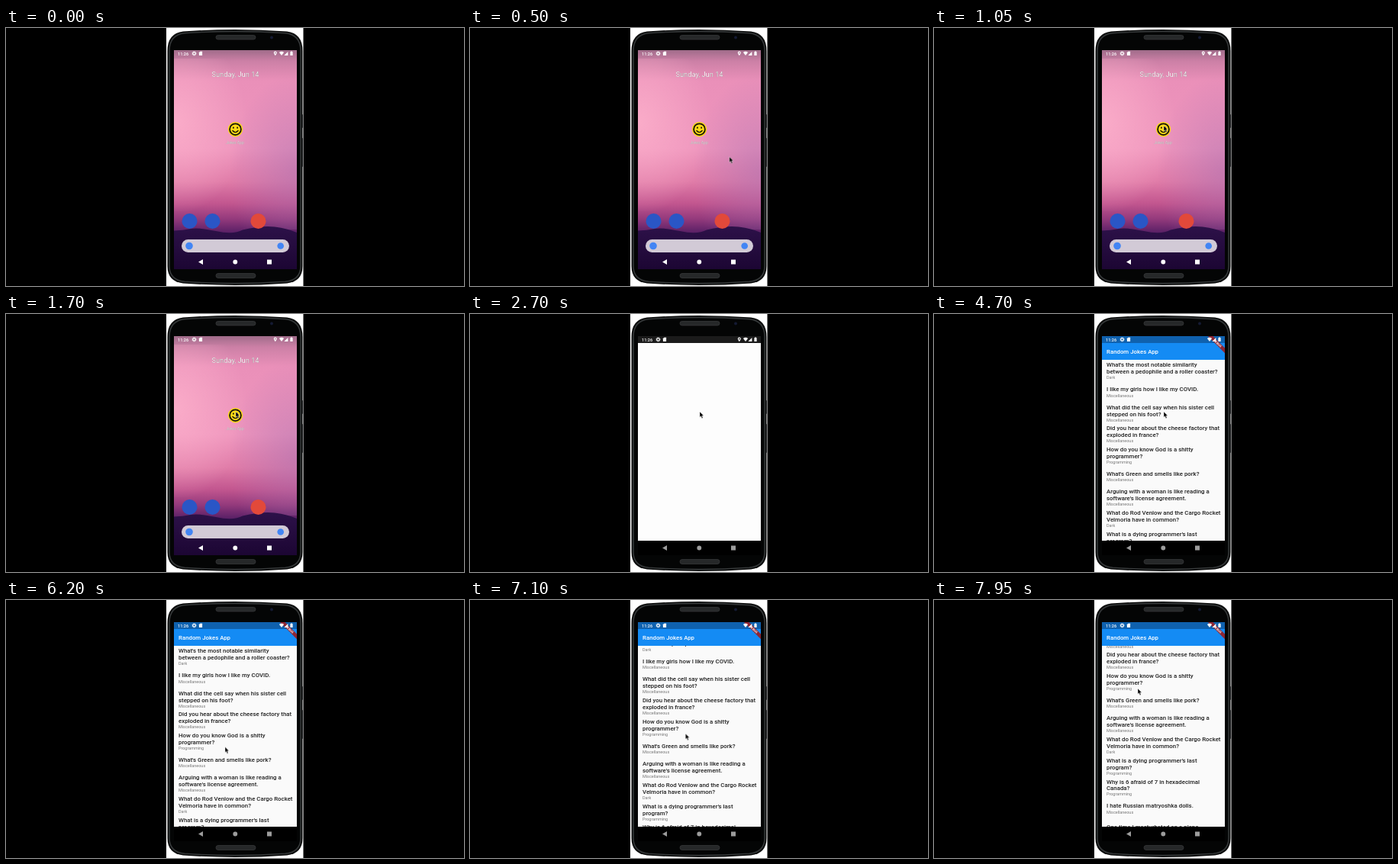
Animation, 600 px wide and 338 px high, one loop 8000 ms. Source, as an HTML page:

```html
<!DOCTYPE html>
<html lang="en">
<head>
<meta charset="utf-8">
<title>Jokes app demo</title>
<style>
  html, body { margin: 0; width: 100%; height: 100%; overflow: hidden; background: #000; }
  svg { display: block; width: 100vw; height: 100vh; }
  text { font-family: Roboto, "Noto Sans", sans-serif; }
  .joke { font-size: 7.83px; font-weight: 500; fill: #222; }
  .kind { font-size: 5.48px; fill: #777; }
  .bar-title { font-size: 7.83px; font-weight: 500; fill: #fff; }
  .date { font-size: 9.3px; fill: #fff; text-anchor: middle; filter: drop-shadow(.3px .6px .6px #0009); }
  .label { font-size: 5px; fill: #fff; text-anchor: middle; filter: drop-shadow(.2px .4px .5px #0009); }
  .clock { font-size: 5.6px; font-weight: 500; fill: #fff; }
  .debug { font-size: 4px; font-weight: 700; fill: #fff; text-anchor: middle; }
  #splash { transform-origin: 300px 132px; }
  #spinner { transform-origin: 300.5px 178.5px; }
</style>
</head>
<body>
<svg viewBox="0 0 600 338" preserveAspectRatio="none">
  <defs>
    <linearGradient id="sky" x2="0" y2="1">
      <stop offset="0" stop-color="#a06c8a"/>
      <stop offset=".05" stop-color="#cc80a6"/>
      <stop offset=".14" stop-color="#ea90b9"/>
      <stop offset=".45" stop-color="#ee95bd"/>
      <stop offset=".6" stop-color="#e07ca8"/>
      <stop offset=".7" stop-color="#c2568f"/>
      <stop offset=".77" stop-color="#943a7c"/>
      <stop offset=".83" stop-color="#5c2167"/>
    </linearGradient>
    <radialGradient id="glow" cx="0" cy=".42" r=".6">
      <stop offset="0" stop-color="#ffb4cd" stop-opacity=".75"/>
      <stop offset="1" stop-color="#ffb4cd" stop-opacity="0"/>
    </radialGradient>
    <radialGradient id="haze" cx="1" cy=".68" r=".55">
      <stop offset="0" stop-color="#ab70b0" stop-opacity=".55"/>
      <stop offset="1" stop-color="#ab70b0" stop-opacity="0"/>
    </radialGradient>
    <linearGradient id="hills" x2="0" y2="1">
      <stop offset="0" stop-color="#2d1149"/>
      <stop offset="1" stop-color="#1c0633"/>
    </linearGradient>
    <clipPath id="screen"><rect x="220" y="29" width="161" height="287"/></clipPath>
    <clipPath id="body"><rect x="220" y="60" width="161" height="237"/></clipPath>
  </defs>

  <rect width="600" height="338"/>
  <rect x="210" width="179.5" height="338" fill="#fff"/>
  <rect x="386" y="113" width="3" height="18" rx="1" fill="#4a4e52"/>
  <rect x="386" y="144" width="3" height="38" rx="1" fill="#4a4e52"/>
  <path d="M211.5 30Q211.5 7 232 4.5Q300 -.5 368 4.5Q388.5 7 388.5 30V312Q388.5 332 368 334.5Q300 339.5 232 334.5Q211.5 332 211.5 312Z" fill="#0a0b0b"/>
  <path d="M214 30Q214 9 234 6.8Q300 2 366 6.8Q386 9 386 30V312Q386 330 366 332.3Q300 337 234 332.3Q214 330 214 312Z" fill="#040505" stroke="#343738" stroke-width="1.6"/>
  <g fill="#262829" stroke="#3a3c3d" stroke-width=".7">
    <rect x="275" y="9.5" width="52" height="5.5" rx="2.7"/>
    <rect x="275" y="321.5" width="52" height="6" rx="3"/>
  </g>
  <circle cx="348" cy="12.5" r="2" fill="#141a33"/>

  <g clip-path="url(#screen)">
    <g id="home">
      <rect x="220" y="29" width="161" height="287" fill="url(#sky)"/>
      <rect x="220" y="40" width="161" height="200" fill="url(#glow)"/>
      <rect x="220" y="29" width="161" height="235" fill="url(#haze)"/>
      <path d="M220 265.5Q232 265 242 263T275 266T310 264.5Q335 258.5 352 260.5T381 268V316H220Z" fill="url(#hills)"/>
      <text class="date" x="300.5" y="64.3">Sunday, Jun 14</text>
      <circle cx="300.5" cy="132.7" r="9.7" fill="#fbd914"/>
      <g fill="none" stroke="#17130a" stroke-width="1.8" stroke-linecap="round">
        <circle cx="300.5" cy="132.7" r="7.4"/>
        <path d="M296.9 134.5Q300.5 138.6 304.1 134.5" stroke-width="1.3"/>
        <path d="M297.9 130.5v.3M303.1 130.5v.3" stroke-width="1.9"/>
      </g>
      <text class="label" x="300" y="152.3">Jokes App</text>
      <circle cx="240.5" cy="253" r="10" fill="#2a56c6"/>
      <circle cx="270.5" cy="253" r="10" fill="#2a56c6"/>
      <circle cx="330.5" cy="253" r="10" fill="#e2493a"/>
      <rect x="230" y="277" width="141" height="17" rx="8.5" fill="#d2cad6"/>
      <circle cx="240" cy="285.5" r="4.8" fill="#4285f4"/>
      <circle cx="359.7" cy="285.5" r="4.3" fill="#4285f4"/>
    </g>

    <rect id="splash" x="220" y="38" width="161" height="259" fill="#fdfdfd"/>
    <g id="bars">
      <rect x="220" y="29" width="161" height="9" fill="#1b1b1b"/>
      <rect x="220" y="297" width="161" height="19"/>
    </g>

    <g id="app">
      <rect x="220" y="38" width="161" height="259" fill="#fafafa"/>
      <circle id="spinner" cx="300.5" cy="178.5" r="7" fill="none" stroke="#148bf4"
        stroke-width="1.57" pathLength="100"/>
      <g id="page" clip-path="url(#body)"><g id="list"></g></g>
      <rect x="220" y="29" width="161" height="9.3" fill="#0f61ae"/>
      <rect x="220" y="38" width="161" height="22" fill="#148bf4"/>
      <text class="bar-title" x="226" y="52">Random Jokes App</text>
      <g transform="translate(381 29) rotate(45)">
        <rect x="-20" y="11" width="40" height="4.7" fill="#8e2634"/>
        <text class="debug" y="14.8">DEBUG</text>
      </g>
    </g>

    <g fill="#fff">
      <text class="clock" x="225" y="35.5">11:26</text>
      <circle cx="246.5" cy="33.4" r="1.8" fill="none" stroke="#fff" stroke-width="1.3"/>
      <circle cx="246.5" cy="33.4" r="2.6" fill="none" stroke="#fff" stroke-width=".8" stroke-dasharray="1 1.04"/>
      <path d="M254.3 30.8h2.8v5.2h-4.2v-3.8z"/>
      <path id="pin" fill-rule="evenodd" d="M352.8 36.2q-2-2.4-2-3.6a2 2 0 0 1 4 0q0 1.2-2 3.6zm0-4.4a.8.8 0 1 0 .01 0z"/>
      <path d="M357.9 32q3.1-2.3 6.2 0l-3.1 4z"/>
      <path d="M369.4 31v5h-5z"/>
      <path d="M372.4 31.2h.8v-.7h1.6v.7h.8V36h-3.2z"/>
    </g>
    <g id="nav" fill="#fff">
      <path d="M252 306.5l6-3.4v6.8z"/>
      <circle cx="300.3" cy="306.5" r="2.9"/>
      <rect x="342" y="303.5" width="6" height="6"/>
    </g>
    <path id="cursor" d="M0 0V7.2L1.6 5.8L2.8 8.7L4.1 8.1L2.9 5.3H5.1Z" stroke="#fff" stroke-width=".4"/>
  </g>
</svg>
<script>
const LOOP = 8000;
const $ = id => document.getElementById(id);

const jokes = [
  ["Dark", "What's the most notable similarity", "between a pedophile and a roller coaster?"],
  ["Miscellaneous", "I like my girls how I like my COVID."],
  ["Miscellaneous", "What did the cell say when his sister cell", "stepped on his foot?"],
  ["Miscellaneous", "Did you hear about the cheese factory that", "exploded in france?"],
  ["Programming", "How do you know God is a shitty", "programmer?"],
  ["Miscellaneous", "What's Green and smells like pork?"],
  ["Miscellaneous", "Arguing with a woman is like reading a", "software's license agreement."],
  ["Dark", "What do Rod Venlow and the Cargo Rocket", "Velmoria have in common?"],
  ["Programming", "What is a dying programmer's last", "program?"],
  ["Programming", "Why is 6 afraid of 7 in hexadecimal", "Canada?"],
  ["Miscellaneous", "I hate Russian matryoshka dolls."],
  ["Miscellaneous", "One time I masturbated on a plane"]
];

function addText(className, y, content) {
  const node = document.createElementNS("http://www.w3.org/2000/svg", "text");
  node.setAttribute("class", className);
  node.setAttribute("x", 226);
  node.setAttribute("y", y);
  node.textContent = content;
  $("list").append(node);
}

jokes.forEach(([kind, ...lines], row) => {
  const single = lines.length === 1;
  const top = 69.2 + row * 27.7 + (single ? 4 : 0);
  lines.forEach((line, i) => addText("joke", top + i * 8.9, line));
  addText("kind", top + lines.length * 8.9 - (single ? 1.2 : 1.9), kind);
});

// Table rows: [time in ms, value, easing to the next row]
function play(id, property, table) {
  const frames = table.map(([ms, value, easing = "linear"]) =>
    ({ offset: ms / LOOP, [property]: value, easing }));
  frames.push({ offset: 1, [property]: table.at(-1)[1] });
  $(id).animate(frames, { duration: LOOP, iterations: Infinity });
}

const switchAt = (id, ms, property = "opacity", before = 0, after = 1) =>
  play(id, property, [[0, before, "step-end"], [ms, after]]);
const at = (x, y) => `translate(${x}px, ${y}px)`;

switchAt("cursor", 400);
switchAt("bars", 2350);
switchAt("nav", 2350, "fill", "#fff", "#9c9c9c");
switchAt("app", 3000);
switchAt("pin", 3000, "opacity", 1, 0);
switchAt("page", 4200);
switchAt("spinner", 4200, "opacity", 1, 0);

play("splash", "transform", [
  [0, "scale(0)"], [2100, "scale(0)", "ease-out"], [2350, "scale(1)"]
]);
play("cursor", "transform", [
  [0, at(360, 190)], [400, at(360, 190), "ease-out"], [850, at(301, 128)],
  [4900, at(301, 128), "ease-in"], [5500, at(293, 171), "ease-out"], [5800, at(287, 192)],
  [6700, at(287, 193), "ease-in-out"], [7900, at(267, 116)]
]);
play("list", "transform", [
  [0, at(0, 0)], [6700, at(0, 0), "ease-in-out"], [7900, at(0, -78)]
]);

// Six spinner turns fit one loop; the delay starts a turn as the spinner appears.
$("spinner").animate([
  { transform: "rotate(-90deg)", strokeDasharray: "3 97", strokeDashoffset: 0, easing: "ease-in-out" },
  { transform: "rotate(0deg)", strokeDasharray: "75 25", strokeDashoffset: 0, easing: "ease-in-out" },
  { transform: "rotate(270deg)", strokeDasharray: "3 97", strokeDashoffset: -97 }
], { duration: LOOP / 6, delay: -1000, iterations: Infinity });
</script>
</body>
</html>
```
